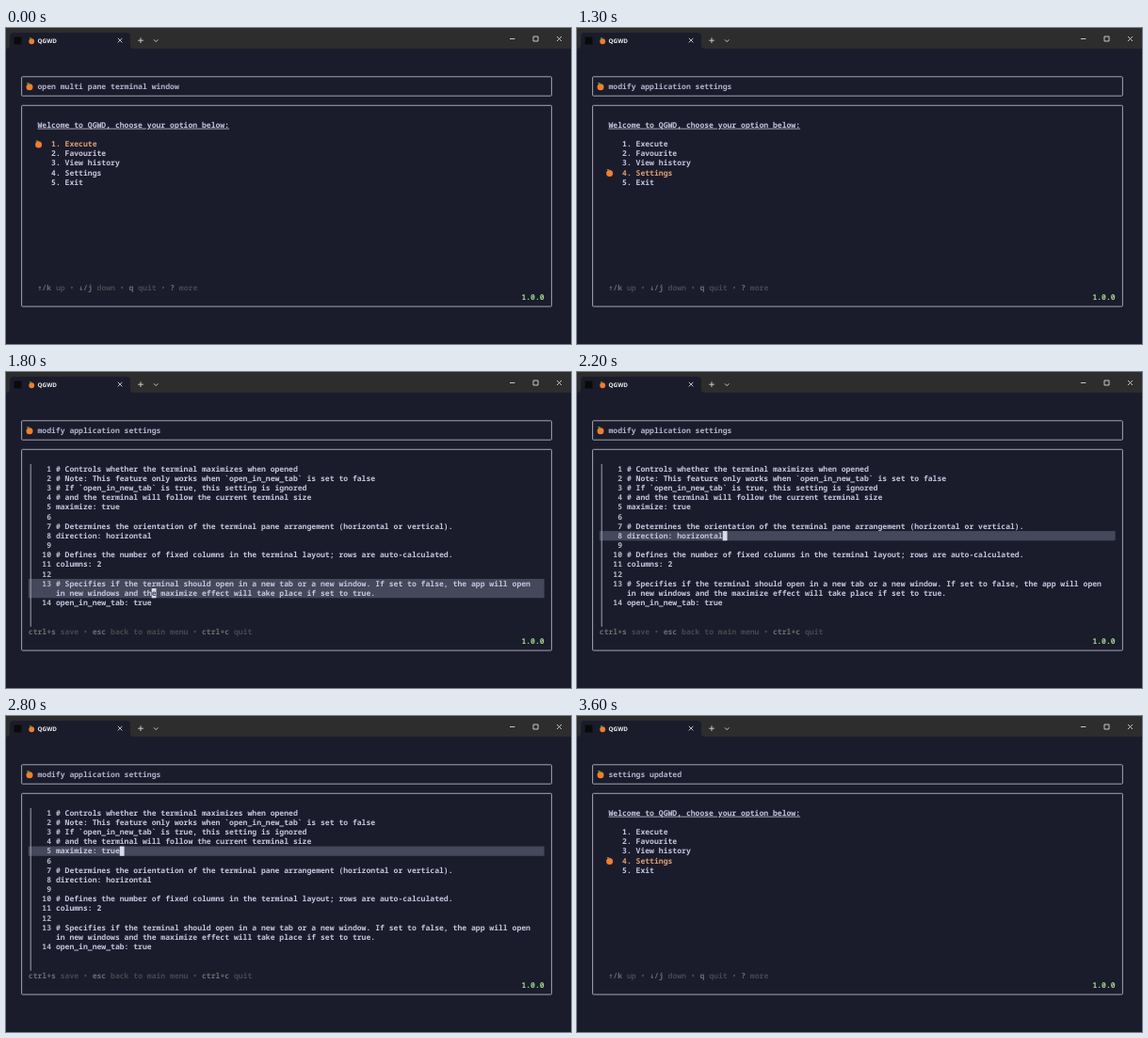
Write an HTML page that moves like this. It is 600 px wide and 336 px high and loops after 3.9 s.

```html
<!DOCTYPE html>
<html lang="en">
<head>
<meta charset="utf-8">
<style>
  html, body { margin: 0; width: 100%; height: 100%; overflow: hidden; background: #1b1c2b; }
  svg { display: block; width: 600px; height: 336px; }
  text { white-space: pre; text-rendering: geometricPrecision; }
  .mono { font: 600 8.08px "Noto Sans Mono", "DejaVu Sans Mono", monospace; fill: #c4c5de; }
  .arrow { font-family: "DejaVu Sans Mono", monospace; font-weight: 700; }
  .tab { font: 700 6.3px "Open Sans", "Noto Sans", sans-serif; fill: #f0f0f0; }
  .line { fill: none; stroke: #a2a4b2; stroke-width: 1; }
  .icon { fill: none; stroke: #d8d8d8; stroke-width: .9; }
</style>
</head>
<body>
<svg viewBox="0 0 600 336">
  <rect width="600" height="336" fill="#1b1c2b"/>
  <rect width="600" height="22" fill="#2d2d2d"/>
  <path d="M0 22Q4 22 4 18V9Q4 5 8 5H128Q132 5 132 9V18Q132 22 136 22Z" fill="#1b1c2b"/>
  <rect x="8.5" y="9.5" width="8" height="8" fill="#0a0a0a"/>
  <text class="tab" x="33.6" y="16">QGWD</text>
  <path class="icon" d="M118.8 10.8l4.6 4.6m0-4.6l-4.6 4.6M140.2 13.2h5.6m-2.8-2.8v5.6M157 12.4l2.2 2.2 2.2-2.2"/>
  <path class="icon" d="M535 11.5h5.4M560 9h5v5h-5zM585 9l5 5m0-5l-5 5"/>
  <rect class="line" x="16.6" y="51.8" width="562.8" height="20.4" rx=".8"/>
  <rect class="line" x="16.6" y="82.3" width="562.8" height="213.8" rx=".8"/>
  <g id="view"></g>
</svg>
<script>
const LOOP = 3900, CELL = 4.848, ROW = 10.17;
const view = document.getElementById("view");

const menu = ["Execute", "Favourite", "View history", "Settings", "Exit"];
const about = ["open multi pane terminal window", "select from favourite commands",
  "view command history", "modify application settings"];
const rows = [
  "# Controls whether the terminal maximizes when opened",
  "# Note: This feature only works when `open_in_new_tab` is set to false",
  "# If `open_in_new_tab` is true, this setting is ignored",
  "# and the terminal will follow the current terminal size",
  "maximize: true",
  "",
  "# Determines the orientation of the terminal pane arrangement (horizontal or vertical).",
  "direction: horizontal",
  "",
  "# Defines the number of fixed columns in the terminal layout; rows are auto-calculated.",
  "columns: 2",
  "",
  "# Specifies if the terminal should open in a new tab or a new window. If set to false, the app will open",
  "in new windows and the maximize effect will take place if set to true.",
  "open_in_new_tab: true"
];

const colX = c => 4.4 + c * CELL;
const rowY = r => 97.9 + (r - 1) * ROW;
const text = (c, r, s, attrs = "") =>
  `<text class="mono" x="${colX(c)}" y="${rowY(r) + 7.8}" ${attrs}>${s}</text>`;
const tint = color => `style="fill:${color}"`;
const block = (c, r, w, h, color) =>
  `<rect x="${colX(c)}" y="${rowY(r)}" width="${w * CELL}" height="${h * ROW}" fill="${color}"/>`;
const fruit = (x, y, r) =>
  `<g transform="translate(${x} ${y}) scale(${r})"><circle cy=".15" r="1" fill="#ee7f2d"/>` +
  `<path d="M.1-.7Q-.1-1.4-.9-1.1Q-.6-.5.1-.7Z" fill="#5aa845"/></g>`;

// Pairs of "key label" joined by bullets, key brighter than label
const hints = (c, list) => text(c, 18, list.map(s => {
  const [key, ...label] = s.split(" ");
  const glyphs = key.replace(/[↑↓]/, '<tspan class="arrow">$&</tspan>');
  return `<tspan fill="#6c6c72">${glyphs}</tspan> ${label.join(" ")}`;
}).join(" • "), tint("#47474f"));

function drawMenu(pick) {
  return text(6, 1, "Welcome to QGWD, choose your option below:", 'text-decoration="underline"') +
    menu.map((s, i) => text(9, 3 + i, `${i + 1}. ${s}`, i === pick ? tint("#dc9f76") : "")).join("") +
    fruit(34.6, rowY(3 + pick) + 5.3, 3.5) +
    hints(6, ["↑/k up", "↓/j down", "q quit", "? more"]);
}

function drawEditor(row) {
  const wrapped = row === 13 || row === 14;
  const col = Math.min(21, rows[row - 1].length);
  let out = block(4, wrapped ? 13 : row, 113, wrapped ? 2 : 1, "#45475a");
  out += `<path class="line" d="M${colX(4.5)} ${rowY(1)}V${rowY(18)}"/>`;
  rows.forEach((s, i) => {
    if (i !== 13) out += text(7, i + 1, String(i < 13 ? i + 1 : i).padStart(2), tint("#b4b6c8"));
    out += text(10, i + 1, s);
  });
  return out + block(10 + col, row, 1, 1, "#d9dbe8") +
    text(10 + col, row, rows[row - 1][col] || "", tint("#45475a")) +
    hints(4, ["ctrl+s save", "esc back to main menu", "ctrl+c quit"]);
}

// Held up-arrow repeats to the top, then single steps down
function cursorRow(t) {
  if (t < 1800) return 15;
  if (t < 2400) return Math.min(14, Math.floor(1 + (2400 - t) * .035));
  return Math.min(5, 1 + (t - 2400) / 100);
}

function draw(t) {
  const editing = t >= 1500 && t < 3400;
  const pick = [900, 1100, 1300].filter(at => t >= at).length;
  const status = t >= 3400 ? "settings updated" : about[pick];
  view.innerHTML = fruit(27.2, 13.8, 2.9) + fruit(25, 62.1, 3.5) +
    text(6, -3, status, tint("#b3b1cc")) +
    (editing ? drawEditor(cursorRow(t)) : drawMenu(pick)) +
    text(112, 19, "1.0.0", tint("#a0d297"));
}

const start = performance.now();
let shown = -1;
function frame() {
  const t = Math.floor((performance.now() - start) % LOOP / 100) * 100;
  if (t !== shown) draw(shown = t);
  requestAnimationFrame(frame);
}
frame();
</script>
</body>
</html>
```
